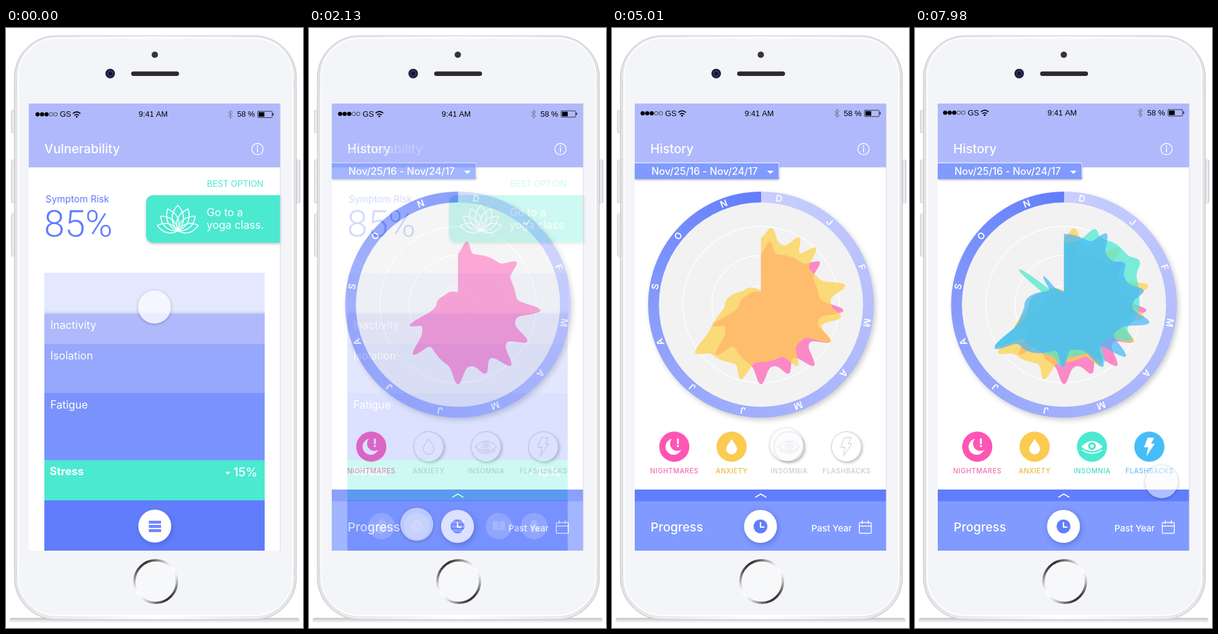
These frames come from a looping animation (496 by 1001 pixels, 8000 ms). An HTML page with a canvas:

```html
<!DOCTYPE html>
<html lang="en">
<head>
<meta charset="utf-8">
<title>Symptom tracker</title>
<style>
html, body { margin: 0; width: 496px; height: 1001px; overflow: hidden; background: #fff; }
canvas { display: block; }
</style>
</head>
<body>
<canvas width="496" height="1001"></canvas>
<script>
const LOOP = 8000, TAU = Math.PI * 2, DEG = Math.PI / 180;
const SANS = 'Inter, sans-serif', SYSTEM = '"Liberation Sans", Arial, sans-serif', DIGITS = 'Roboto, sans-serif';
const BLUE = '#617dfc', LIGHT = '#b0b9fc', BAR = '#809aff', TEAL = '#4be9d0', WHITE = '#fff', GREY = '#ccc';
const WHEEL = { x: 248.8, y: 461.5 };
const stage = document.querySelector('canvas');
const main = stage.getContext('2d');
const layer = stage.cloneNode();
const layerCtx = layer.getContext('2d');
let c = main;

const clamp = v => Math.max(0, Math.min(1, v));
const mix = (a, b, k) => a + (b - a) * k;
const ease = k => k * k * (3 - 2 * k);
const ramp = (t, from, to) => ease(clamp((t - from) / (to - from)));

function at(x, y, draw) {
  c.save();
  c.translate(x, y);
  draw();
  c.restore();
}

function faded(alpha, draw) {
  c.save();
  c.globalAlpha = alpha;
  draw();
  c.restore();
}

function shaded(color, blur, dx, dy, draw) {
  c.save();
  Object.assign(c, { shadowColor: color, shadowBlur: blur, shadowOffsetX: dx, shadowOffsetY: dy });
  draw();
  c.restore();
}

function paint(path, fill, stroke, width = 1) {
  if (fill) { c.fillStyle = fill; c.fill(path); }
  if (stroke) { c.strokeStyle = stroke; c.lineWidth = width; c.stroke(path); }
}

function box(x, y, w, h, fill, r = 0, stroke, width) {
  const p = new Path2D();
  p.roundRect(x, y, w, h, r);
  paint(p, fill, stroke, width);
}

function disc(x, y, r, fill, stroke, width) {
  const p = new Path2D();
  p.arc(x, y, r, 0, TAU);
  paint(p, fill, stroke, width);
}

function line(d, color, width) {
  c.lineCap = c.lineJoin = 'round';
  paint(new Path2D(d), null, color, width);
}

function text(s, x, y, size, color, { weight = 400, align = 'left', spacing = 0, family = SANS } = {}) {
  c.font = `${weight} ${size}px ${family}`;
  c.textAlign = align;
  c.letterSpacing = spacing + 'px';
  c.fillStyle = color;
  c.fillText(s, x, y);
  c.letterSpacing = '0px';
}

function gradient(x0, y0, x1, y1, ...stops) {
  const g = c.createLinearGradient(x0, y0, x1, y1);
  stops.forEach((s, i) => g.addColorStop(i / (stops.length - 1), s));
  return g;
}

// Radial chart: a smooth level given every 45 degrees, plus narrow peaks of [angle, height].
function radial(levels, peaks) {
  const p = new Path2D();
  for (let a = 0; a <= 360; a++) {
    const i = Math.min(7, Math.floor(a / 45));
    let r = mix(levels[i], levels[i + 1], ease(a / 45 - i));
    for (const [angle, height] of peaks) r += height * Math.exp(-(((a - angle) / 5) ** 2));
    p.lineTo(WHEEL.x + r * Math.sin(a * DEG), WHEEL.y - r * Math.cos(a * DEG));
  }
  p.closePath();
  return p;
}

const drop = new Path2D('M0-13C3-7 9-2 9 4A9 9 0 0 1-9 4C-9-2-3-7 0-13Z');
const bolt = new Path2D('M-3-15H8L3-5H9L-5 16L-2 1H-9Z');
const eye = new Path2D('M-18 0Q0-19 18 0Q0 15-18 0Z');

const symptoms = [
  { name: 'NIGHTMARES', color: '#ff55b4', label: '#f26fb3', fill: '#ff62b8', on: -1000,
    shape: radial([83, 97, 98, 103, 105, 78, 36, 26, 21],
      [[8, 22], [54, 24], [94, 40], [118, 30], [139, 32], [158, 20], [180, 28], [222, 34], [247, 30]]),
    draw(color) {
      disc(-1, 0, 13.5, WHITE);
      disc(5, -5, 12, color);
      box(4.5, -14, 3, 10, WHITE, 1.5);
      disc(6, -1, 1.8, WHITE);
    } },
  { name: 'ANXIETY', color: '#fbcb52', label: '#e6bd42', fill: '#ffd24c', on: 3870,
    shape: radial([110, 98, 116, 90, 96, 116, 60, 36, 24],
      [[8, 20], [30, 28], [44, 34], [77, 32], [99, 22], [118, 34], [149, 28], [195, 28], [234, 26]]),
    draw(color) { paint(drop, color && WHITE, color ? null : GREY); } },
  { name: 'INSOMNIA', color: TEAL, label: '#4bdcc5', fill: TEAL, on: 5180,
    shape: radial([103, 134, 126, 90, 88, 88, 58, 34, 22],
      [[22, 18], [60, 14], [118, 26], [145, 28], [183, 16], [239, 54], [308, 60]]),
    draw(color) {
      const edge = color ? WHITE : GREY;
      paint(eye, color && WHITE, color ? null : GREY);
      disc(0, -1, 6, color, color || GREY);
      disc(0, -1, 2.5, color && WHITE, edge);
      line('M-16 6Q0 16 16 6', edge, color ? 2 : 1);
    } },
  { name: 'FLASHBACKS', color: '#46bdf8', label: '#66c4f2', fill: '#48b8fb', on: 6780,
    shape: radial([118, 108, 114, 90, 74, 100, 66, 34, 22],
      [[31, 28], [56, 14], [80, 22], [102, 36], [130, 44], [148, 36], [181, 30], [238, 44], [324, 26]]),
    draw(color) { paint(bolt, color && WHITE, color ? null : GREY); } }
];
symptoms.forEach((s, i) => s.x = 104 + 95.8 * i);

function drawPhone() {
  c.fillStyle = WHITE;
  c.fillRect(0, 0, 496, 1001);
  const sideButton = (x, y, h) =>
    box(x, y, 6, h, gradient(x, 0, x + 6, 0, '#d2d3d6', '#f8f8f9', '#c6c8cb'), 2, '#c9cacd', .8);
  sideButton(9, 137, 38);
  sideButton(9, 310, 71);
  for (const x of [9, 485]) sideButton(x, 220, 72);
  box(6, 984, 484, 9, gradient(0, 984, 0, 993, '#c4c4c6', WHITE), 4);
  box(14, 13, 471, 974, gradient(14, 0, 485, 0, '#e2e3e6', WHITE, '#e2e3e6'), 70, '#bfc1c5', 1);
  for (const y of [90, 898])
    for (const x of [14, 478]) box(x, y, 7, 14, '#dcdee2');
  box(20, 17, 459, 963, '#f4f5f8', 64, WHITE, 2);
  disc(248.5, 44.5, 5.3, '#353538');
  disc(174, 76, 8, '#20213d');
  disc(174, 76, 4, '#12132b', '#3a3c70', 1.5);
  box(209, 72.5, 80, 7.5, '#2b2b2d', 4);
  const ring = c.createConicGradient(0, 250, 923.5);
  for (let i = 0; i <= 24; i++) {
    const shade = 60 - 40 * Math.cos(2 * (i / 24 * TAU - 55 * DEG));
    ring.addColorStop(i / 24, `hsl(0 0% ${shade}%)`);
  }
  disc(250, 923.5, 35.5, '#f7f8fa', ring, 4);
}

// The status bar slowly grows away from the middle of the phone.
function drawStatus(t) {
  const scale = 1 + .012 * t / LOOP;
  c.save();
  c.translate(248, 376);
  c.scale(scale, scale);
  c.translate(-248, -376);
  for (let i = 0; i < 5; i++)
    disc(52.7 + i * 7.5, 144, i < 3 ? 3.5 : 3, i < 3 ? '#000' : null, i < 3 ? null : '#222', .8);
  const label = (s, x, align) => text(s, x, 148.3, 13, '#000', { align, family: SYSTEM });
  label('GS', 90);
  label('9:41 AM', 245.8, 'center');
  label('58 %', 386);
  disc(118, 148, 1.5, '#000');
  line('M114.8 145.4Q118 142.8 121.2 145.4M112.3 142.3Q118 137.6 123.7 142.3', '#000', 1.8);
  line('M371 140.5L378 147.5L374.5 151V137.5L378 140.8L371 147.8', '#777', 1);
  box(420.5, 139, 24, 10.5, null, 1, '#222', .9);
  box(422, 140.5, 9.5, 7.5, '#000');
  box(445.5, 142, 1.5, 4, '#222');
  c.restore();
}

function drawHeader(title) {
  box(38, 126, 420, 746, WHITE);
  box(38, 126, 420, 106.5, LIGHT);
  text(title, 64, 209, 21, WHITE, { weight: 500 });
  disc(420, 202, 9.5, null, WHITE, 1.4);
  box(419.2, 200, 1.6, 7.5, WHITE);
  disc(420, 197, 1.2, WHITE);
}

function drawLotus() {
  for (let i = -3; i <= 3; i++) at(287, 338.5, () => {
    const h = 43 - 2.5 * Math.abs(i), w = 14 - Math.abs(i);
    c.rotate(i * 25 * DEG);
    line(`M0 0C${-w} ${-h * .35} ${-w * .8} ${-h * .7} 0 ${-h}C${w * .8} ${-h * .7} ${w} ${-h * .35} 0 0Z`, WHITE, 1.6);
  });
}

function drawClock(x, y, r, face, hands) {
  disc(x, y, r, face);
  line(`M${x} ${y - r * .55}V${y + r * .1}H${x + r * .5}`, hands, r * .2);
}

const menuIcons = [
  () => {
    line('M-6-4V4M-2.3-9V3M1.7-10V3M5.5-7V4M9 1L5 9', WHITE, 3.3);
    box(-7.5, 0, 14, 12, WHITE, 5);
  },
  () => drawClock(0, 0, 9.5, WHITE, '#c2cafd'),
  () => {
    paint(new Path2D('M-10-8Q-5-10-.7-7V8Q-5 5-10 7Z'), WHITE);
    paint(new Path2D('M10-8Q5-10 .7-7V8Q5 5 10 7Z'), WHITE);
  },
  () => {
    disc(0, -4.5, 5.5, WHITE);
    paint(new Path2D('M-8 8Q-8 0 0 0Q8 0 8 8Q0 13-8 8Z'), WHITE);
  }
];

function drawMenu(open) {
  const bars = color => { for (let i = 0; i < 3; i++) box(238.5, 822 + 7 * i, 20.5, 5, color); };
  menuIcons.forEach((icon, i) => {
    const dx = (i < 2 ? -1 : 1) * (i % 3 ? 68.5 : 127.5);
    faded(open, () => at(248.5 + dx * open, 831, () => {
      disc(0, 0, 22, '#bfc8fd');
      icon();
    }));
  });
  shaded('rgba(30,50,150,.3)', 10, 2, 3, () => disc(248.5, 831, 27.5, WHITE));
  bars('#7088fd');
  faded(open, () => {
    disc(248.5, 831, 27.5, '#7c90fd');
    bars(WHITE);
  });
}

function drawVulnerability(t) {
  drawHeader('Vulnerability');
  text('Symptom Risk', 66, 290.5, 15.8, BLUE);
  text('85%', 63.5, 348, 62, BLUE, { weight: 300, family: DIGITS });
  text('BEST OPTION', 430, 265, 14.2, TEAL, { align: 'right' });
  shaded('rgba(0,0,0,.25)', 4, 0, 2, () => box(234, 279, 224, 79, TEAL, [12, 0, 0, 12]));
  drawLotus();
  text('Go to a', 335, 314, 18, WHITE);
  text('yoga class.', 335, 335, 18, WHITE);

  box(64, 408.5, 368, 68, '#e4e8ff');
  box(64, 471, 368, 6, gradient(0, 471, 0, 477, 'rgba(140,150,200,0)', 'rgba(140,150,200,.3)'));
  const bands = [['Inactivity', 476.5, LIGHT], ['Isolation', 527, '#96a8fb'], ['Fatigue', 609, '#7a93fc']];
  for (const [name, y, color] of bands) {
    box(64, y, 368, 872 - y, color);
    text(name, 74, y + 25.5, 18, WHITE);
  }
  box(64, 721, 368, 67, TEAL);
  text('Stress', 73, 746, 18.3, WHITE, { weight: 700 });
  text('15%', 420, 748, 20, WHITE, { weight: 500, align: 'right' });
  paint(new Path2D('M366 740.5H375L370.5 745Z'), WHITE);
  box(64, 788, 368, 84, BLUE);
  drawMenu(ramp(t, 850, 1200));
}

function drawWheel(t) {
  const { x, y } = WHEEL;
  const ring = c.createConicGradient(-Math.PI / 2, x, y);
  ['#c8cefe', '#b0bafd', '#93a4fc', BLUE].forEach((color, i) => ring.addColorStop(i / 3, color));
  shaded('rgba(0,0,0,.2)', 8, 3, 4, () => disc(x, y, 188.5, ring));
  disc(x, y, 170.5, '#f2f2f2');
  for (const r of [31.5, 82, 130.5]) disc(x, y, r, null, WHITE, 1.3);
  [...'DJFMAMJJASON'].forEach((letter, i) => at(x, y, () => {
    c.rotate((9.7 + i * 30) * DEG);
    text(letter, 0, -174, 15.5, WHITE, { align: 'center', weight: 600 });
  }));
  for (const s of symptoms)
    faded(.72 * ramp(t, s.on + 200, s.on + 560), () => paint(s.shape, s.fill));
}

function drawSymptom(s, t) {
  const lit = ramp(t, s.on, s.on + 180);
  const label = color => text(s.name, s.x + .2, 743, 11.2, color, { align: 'center', spacing: .6, weight: 500 });
  if (lit < 1) {
    shaded('rgba(0,0,0,.28)', 5, 2, 2, () => disc(s.x, 698.5, 25, WHITE));
    disc(s.x, 698.5, 25, null, GREY);
    at(s.x, 698.5, () => s.draw(null));
    label(GREY);
  }
  faded(lit, () => {
    disc(s.x, 698.5, 25.2, s.color);
    at(s.x, 698.5, () => s.draw(s.color));
    label(s.label);
  });
}

function drawHistory(t) {
  drawHeader('History');
  shaded('rgba(0,0,0,.25)', 3, 1, 2, () => box(38, 225.5, 241, 26.5, BAR, [0, 3, 3, 0]));
  line('M38 225H277Q279 225 279 228V249', WHITE, 1);
  text('Nov/25/16 - Nov/24/17', 66, 245, 16.6, WHITE, { weight: 500 });
  paint(new Path2D('M259 238H270L264.5 243.5Z'), WHITE);
  drawWheel(t);
  symptoms.forEach(s => drawSymptom(s, t));

  box(38, 770, 420, 20, BLUE);
  line('M240 782.5L248.5 777.5L257 782.5', WHITE, 2);
  box(38, 789.5, 420, 82.5, BAR);
  text('Progress', 64.5, 839.5, 20.5, WHITE, { weight: 500 });
  text('Past Year', 333, 839.5, 15, WHITE, { weight: 500 });
  box(413, 825, 20, 18, null, 2, WHITE, 1.4);
  line('M413 831H433M418 822V827M428 822V827', WHITE, 1.4);
  shaded('rgba(30,50,150,.35)', 10, 2, 3, () => disc(248, 831.5, 27.5, WHITE));
  drawClock(248, 831.5, 11.5, BLUE, WHITE);
}

// Each move: start, end, destination x and y.
const moves = [
  [0, 700, 248, 831], [1150, 1700, 180, 828], [3300, 3800, 188, 697],
  [4450, 5080, 295, 695], [6000, 6700, 391, 696], [7400, 8050, 412.5, 759]
];

function drawCursor(t) {
  let x = 248, y = 465.5;
  for (const [from, to, toX, toY] of moves) {
    const k = ramp(t, from, to);
    x = mix(x, toX, k);
    y = mix(y, toY, k);
  }
  // The shadow falls only outside the translucent disc.
  const outside = new Path2D();
  outside.rect(0, 0, 496, 1001);
  outside.arc(x, y, 27.5, 0, TAU);
  c.save();
  c.clip(outside, 'evenodd');
  shaded('rgba(0,0,0,.3)', 5, 0, 1, () => disc(x, y, 27.2, WHITE));
  c.restore();
  disc(x, y, 27.5, `rgba(250,250,255,${mix(.8, .52, ramp(t, 0, 700))})`);
}

function frame(now) {
  const t = Math.floor(now % LOOP / 30) * 30;
  const turn = ramp(t, 1900, 2250);
  drawPhone();
  if (turn < 1) drawVulnerability(t);
  if (turn > 0) {
    c = layerCtx;
    c.clearRect(0, 0, 496, 1001);
    drawHistory(t);
    c = main;
    faded(turn, () => c.drawImage(layer, 0, 0));
  }
  box(457.5, 126, 1, 746, '#d5d8e6');
  drawStatus(t);
  drawCursor(t);
  requestAnimationFrame(frame);
}
requestAnimationFrame(frame);
</script>
</body>
</html>
```
